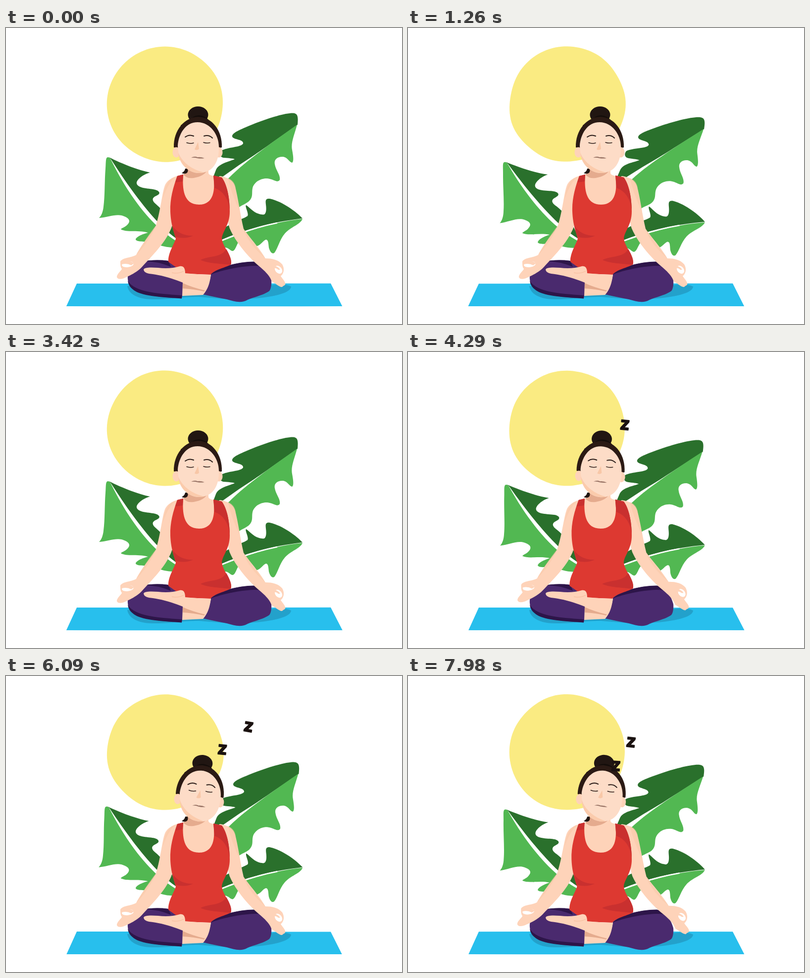
An HTML page for the animation above (8 s loop, 800 by 600 pixels).

```html
<!DOCTYPE html>
<html lang="en">
<head>
<meta charset="utf-8">
<title>Meditation</title>
<style>
html, body { margin: 0; width: 100%; height: 100%; overflow: hidden; background: #fff; }
svg { display: block; width: 100%; height: 100%; }
.dark { fill: #2a702c; }
.light { fill: #52b852; }
.skin { fill: #fed3b9; }
.shade { fill: #e5ab8e; }
.red { fill: #dd3931; }
.fold { fill: #c9302f; }
.purple { fill: #4a2a6e; }
.plum { fill: #2d1549; }
.line { fill: none; stroke: #2a1c18; stroke-linecap: round; }
text { font: 900 38px Lato, sans-serif; text-anchor: middle; fill: #1b1210; stroke: #1b1210; stroke-width: 1.8; stroke-linejoin: round; }
</style>
</head>
<body>
<svg viewBox="0 0 800 600">
  <path id="sun" fill="#faeb82"/>

  <g id="leafLeft">
    <path class="dark" d="M208 262C228 272 262 287 291 293C276 297 263 308 264 315C266 326 292 325 302 328C311 331 313 336 304 340C294 344 294 350 304 358C318 370 336 395 346 428C310 404 262 345 212 266Z"/>
    <path class="light" d="M206 262C201 262 202 270 201 285C199 310 200 340 197 362C196 372 193 380 188 385C205 384 220 377 234 380C250 385 253 392 244 400C240 404 234 405 232 408C245 415 266 409 287 415C274 418 262 424 262 429C267 436 285 429 310 440C324 445 334 445 348 445L348 434C302 408 254 352 212 267Q210 262 206 262Z"/>
  </g>

  <g id="leafTop">
    <path class="dark" d="M589 196C590 183 591 173 580 172.500C560 172 515 188 487 200C468 208 456 214 457 220C459 227 480 225 479 234C476 242 448 241 434 249C430 256 432 262 440 263C450 264 458 264 462 266C450 271 429 275 424 288L418 304H437C475 276 540 231 589 196Z"/>
    <path class="light" d="M588 196C583 216 575 232 578 247C580 258 582 270 578 273C572 272 570 263 560 261C548 260 541 267 543 276C545 289 555 298 553 308C548 315 540 306 528 305C512 304 500 315 498 325C496 334 500 342 491 351C484 357 476 359 470 364L440 312C470 282 520 244 588 196Z"/>
    <path fill="#fff" d="M434 304L441 313Q475 278 512 251Q472 276 434 304Z"/>
  </g>

  <g id="leafLow">
    <path class="dark" d="M599 386C588 374 560 352 533 346C524 345 524 350 525 358C527 373 524 380 517 378C502 377 493 364 485 359C482 362 491 375 488 381C480 387 465 389 425 415L432 431C485 407 540 393 599 386Z"/>
    <path class="light" d="M599 387C594 399 575 403 563 417C552 430 549 448 542 456C537 459 533 453 531 445C530 436 530 429 525 429C519 431 515 440 507 442C495 442 480 425 472 431C466 437 464 451 458 452C453 452 450 445 442 445H428L434 433C485 412 540 393 599 387Z"/>
    <path fill="none" stroke="#fff" stroke-width="2.500" d="M430 433Q490 407 548 395"/>
  </g>

  <path id="mat" fill="#28bfed"/>
  <path fill="#23a1cb" d="M245 523C248 541 270 551 300 550C340 550 350 545 390 545L440 549C490 552 575 545 576 524Q560 516 530 522Z"/>

  <path class="purple" d="M270 475Q298 468 328 472L362 492V516L355 548C325 546 285 544 264 534C249 525 245 514 246 503C247 492 256 482 270 475Z"/>
  <path class="plum" d="M278 472.500Q303 469 328 472L333 484Q307 473 278 472.500ZM246 512C259 537 315 539 355 542V548.500C325 546 285 545 264 535Q247 526 246 512Z"/>
  <path class="purple" d="M414 498C430 483 470 474 503 474C522 479 532 495 536 511C537 520 535 530 532 533C520 542 500 545 488 551C475 559 460 554 446 550Q420 545 398 540Q412 520 414 498Z"/>
  <path class="plum" d="M413 500C428 485 470 473 503 473.500Q515 477 523 485Q507 480 488 483C462 485 430 493 413 500Z"/>

  <g id="armLeft">
    <path class="skin" d="M358 297C344 300 327 305 321 319C315 335 313 367 303 400C297 412 276 435 263 460C253 466 236 465 231 473C231 479 231 485 234 488C235 490 223 499 224 505C226 511 236 509 243 505C255 500 268 492 275 484C290 467 318 440 330 414C338 400 339 385 336 365L360 305Z"/>
    <ellipse cx="246" cy="479" rx="12" ry="5.800" fill="#fff" transform="rotate(-8 246 479)"/>
    <path class="skin" d="M234 474Q246 468 259 477L253 481Q244 476 234 479Z"/>
    <path fill="#fac7a6" opacity=".5" d="M343 301C326 305 320 325 317 346Q326 316 343 301ZM303 400Q285 422 263 460Q287 436 303 400Z"/>
  </g>
  <g id="armRight">
    <path class="skin" d="M432 300C451 303 460 311 463 322C469 345 473 377 480 407C489 421 509 442 524 467C539 467 550 470 558 479C563 488 562 497 555 503C559 509 566 516 564 520C562 523 560 522 558 525C552 526 543 516 537 514C533 502 523 493 514 485C493 468 468 439 455 413Q445 395 449 365L425 305Z"/>
    <ellipse cx="550.500" cy="490" rx="6.500" ry="9" fill="#fff" transform="rotate(-38 550.500 490)"/>
    <path class="skin" d="M542 482Q551 484 554 490L550 490Q546 486 541 487Z"/>
    <path fill="#fac7a6" opacity=".5" d="M448 304Q462 309 464 325Q465 341 473 373Q455 335 448 304ZM480 407Q495 431 524 467Q489 437 480 407Z"/>
  </g>

  <path class="skin" d="M364 282L366 292Q360 297 350 300L354 362H425L429 301Q410 300 409 294V282Z"/>
  <path class="shade" d="M366 285Q365 294 358 297Q366 306 379 304Q402 300 408 286Z"/>
  <path fill="#211612" d="M355 294Q361 291 362 285H367Q369 293 363 295Q359 296 355 294Z"/>

  <g id="torso">
    <path class="red" d="M346 300L358 297C356 325 358 358 390 358C420 358 423 328 419 299L436 303C448 320 452 348 452 372C452 399 438 411 436 426C437 442 456 461 455 478C450 485 425 487 413 500L362 498L328 474C327 456 339 440 343 427C340 416 333 399 332 372C331 346 338 322 346 300Z"/>
    <path class="fold" d="M346 300L358 297L357 311L342 313ZM419 299L436 303C448 320 452 348 452 372Q449 334 421 324ZM336 401Q351 422 378 421Q361 429 342 423ZM393 470C412 461 435 466 445 448C453 462 457 472 454 480C436 478 405 477 393 470Z"/>
  </g>

  <path class="skin" d="M278 490C279 485 292 485 307 486C323 488 338 487 351 483C358 482 362 486 362 497Q390 500 414 500C412 514 409 529 398 541L356 543L357 516C334 507 311 500 289 498Q279 496 278 490Z"/>
  <path class="shade" d="M357 517Q376 526 402 532L400 534Q378 529 357 528Z"/>
  <path fill="none" stroke="#f5bb9b" d="M359 493Q347 499 335 496"/>

  <g id="head">
    <ellipse cx="388" cy="176" rx="20.500" ry="17" fill="#211612"/>
    <path fill="#140d0a" d="M374 187Q375 178 390 177Q402 178 409 186Z"/>
    <path fill="#2b1a14" d="M339 242C338 207 361 181 388 180C417 181 437 208 436 242L429 244L346 243Z"/>
    <ellipse class="skin" cx="344" cy="252" rx="7.500" ry="10.500"/>
    <ellipse class="skin" cx="430" cy="252" rx="7.500" ry="10.500"/>
    <path fill="#fddcc7" d="M347 238C349 215 362 191 387 191C413 191 430 217 430 240C431 264 423 294 389 294C360 293 347 264 347 238Z"/>
    <path fill="#fbcbac" d="M348 253Q361 283 400 293C377 298 351 283 348 253Z"/>
    <path fill="#2b1a14" d="M355 207Q372 187 394 190Q400 194 405 192L407 185L380 182L353 197Z"/>
    <path class="line" stroke-width="2" d="M362 221Q370 215 379 219M400 219Q410 216 417 223"/>
    <path class="line" stroke-width="1.500" d="M365 232.500Q372 235 379 233M399 232Q405 234 412 232.500"/>
    <path fill="#f8c7a7" d="M388 231L381 246Q386 249 390 245Z"/>
    <path fill="#997466" d="M374 263Q381 259 387 262Q394 261 401 264Q393 265 387 264Q381 262 374 263Z"/>
  </g>
  <g id="sleep"></g>
</svg>
<script>
const $ = id => document.getElementById(id);
const clamp = x => Math.max(0, Math.min(1, x));
const ease = x => { x = clamp(x); return x * x * (3 - 2 * x); };
const noise = n => { const s = Math.sin(n * 127.1 + 31.7) * 43758.5453; return 2 * (s - Math.floor(s)) - 1; };

const LOOP = 8000, SWAY = 3510, RISE = 1340;
const births = [4003, 4320, 4624, 5404, 5812, 6115, 7584, 7927];
const tilts = [[3540, 0], [4980, 3.3], [6090, 4.5], [6960, 7.7], [7980, 4.2], [8100, 4]];

const letters = births.map(() => {
  const z = document.createElementNS('http://www.w3.org/2000/svg', 'text');
  z.textContent = 'z';
  z.setAttribute('y', 9.7);
  return $('sleep').appendChild(z);
});

const transform = (id, value) => $(id).setAttribute('transform', value);
const rotate = (id, angle, x, y) => transform(id, `rotate(${angle} ${x} ${y})`);
const bezier = (u, a, b, c, d) => {
  const v = 1 - u;
  return v * v * v * a + 3 * v * v * u * b + 3 * v * u * u * c + u * u * u * d;
};

function headTilt(t) {
  for (let i = 1; i < tilts.length; i++) {
    const [t0, a] = tilts[i - 1], [t1, b] = tilts[i];
    if (t < t1) return a + (b - a) * ease((t - t0) / (t1 - t0));
  }
}

// Hand-drawn outlines redrawn at each boil step
function boil(step) {
  const seed = step * 40;
  let d = '';
  for (let i = 0; i < 120; i++) {
    const a = i * Math.PI / 60;
    let r = 117;
    for (let k = 2; k < 8; k++) r += 0.55 * noise(seed + k) * Math.cos(k * a + 3 * noise(seed + k + 10));
    d += (i ? 'L' : 'M') + (321.7 + noise(seed + 20) * 0.6 + r * Math.cos(a)).toFixed(2) + ' ' + (154.5 + r * Math.sin(a)).toFixed(2);
  }
  $('sun').setAttribute('d', d + 'Z');
  const j = n => noise(seed + 25 + n) * 0.6;
  $('mat').setAttribute('d', `M143 ${518 + j(0)}Q400 ${518 + j(1)} 656 ${518 + j(2)}L${679.3 + j(3)} 564Q400 ${564 + j(4)} ${122 + j(5)} 564Z`);
}

function draw(t) {
  boil(Math.floor(t / 180));

  const p = t % SWAY;
  const sway = clamp(p / 1080) - clamp((p - 1740) / 1140);
  rotate('leafLeft', -3.7 * sway, 350, 429);
  rotate('leafTop', 3 * sway, 425, 375);
  rotate('leafLow', 2.1 * sway, 410, 414);

  const breath = t < SWAY ? 0 : ease(p / 1000) - ease((p - 1600) / 850);
  rotate('armLeft', 0.95 * breath, 335, 310);
  rotate('armRight', -0.95 * breath, 447, 310);
  const s = 1 + 0.014 * breath;
  transform('torso', `translate(${450 * (1 - s)}) scale(${s} 1)`);

  rotate('head', headTilt(t), 380, 290);

  letters.forEach((z, i) => {
    const u = (t - births[i]) / RISE;
    z.style.display = u >= 0 && u < 1 ? '' : 'none';
    const x = bezier(u, 418, 430, 545, 556), y = bezier(u, 192, 112, 95, 26);
    z.setAttribute('transform', `translate(${x} ${y}) rotate(${3 + 13 * u})`);
  });
}

const start = performance.now();
function frame() {
  draw((performance.now() - start) % LOOP);
  requestAnimationFrame(frame);
}
frame();
</script>
</body>
</html>
```
